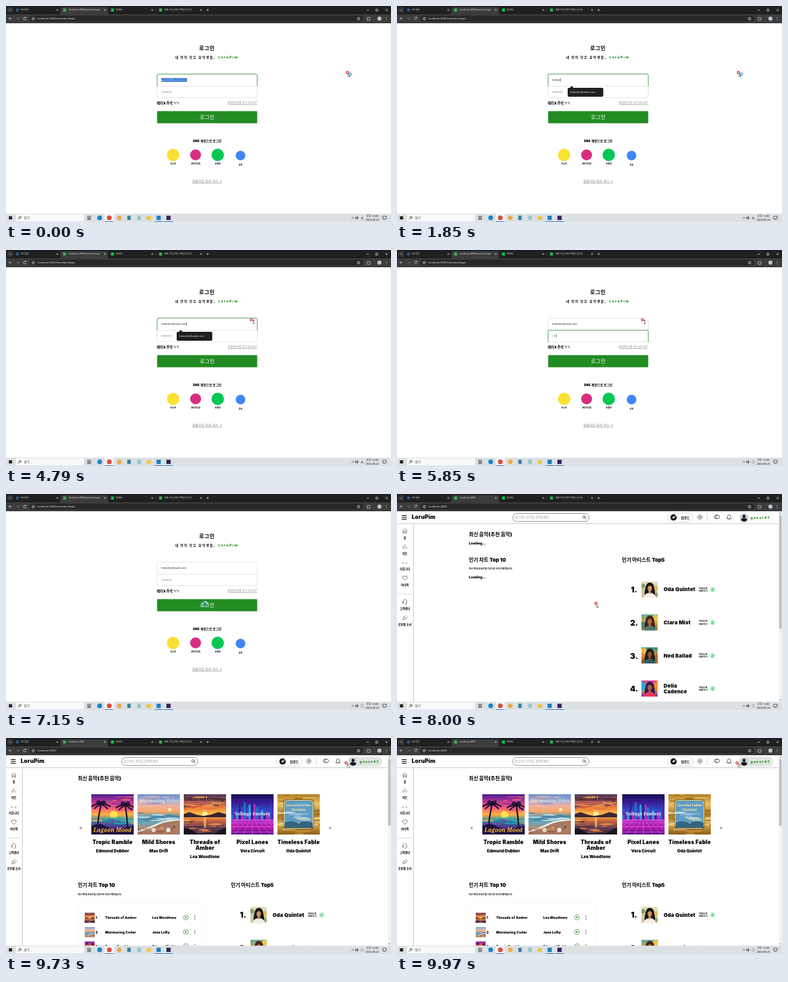
Write an HTML page that moves like this. It is 600 px wide and 338 px high and loops after 10000 ms.

```html
<!DOCTYPE html>
<html>
<head>
<meta charset="utf-8">
<title>Login</title>
<style>
html, body { margin: 0; width: 100%; height: 100%; overflow: hidden; background: #fff; }
svg { display: block; width: 100vw; height: 100vh; }
text { font-family: Inter, 'Noto Sans CJK KR', 'Noto Sans CJK', sans-serif; fill: #111; white-space: pre; }
.u { font-family: 'Noto Sans', 'Noto Sans CJK KR', 'Noto Sans CJK', sans-serif; }
.b { font-weight: 900; fill: #000; }
.m { text-anchor: middle; }
.l { fill: none; stroke: #222; stroke-width: .7; stroke-linecap: round; stroke-linejoin: round; }
.w { fill: none; stroke: #ddd; stroke-width: .7; }
</style>
</head>
<body>
<svg id="stage" viewBox="0 0 600 338"></svg>
<script>
const LOOP = 10000, GREEN = '#228b22';
const BRAND = 'LoruPim', USER = 'guest47', MAIL = 'hnkettle@vozel.com', OLD_MAIL = USER + '@vozel.com';
const LOGIN_URL = 'localhost:3000/member/login', HOME_URL = 'localhost:3000';

// Text is placed by its vertical middle.
const txt = (x, y, size, str, cls = '', attr = '') =>
  `<text x="${x}" y="${y + size * .36}" font-size="${size}" class="${cls}" ${attr}>${str}</text>`;
const box = (x, y, w, h, fill, attr = '') =>
  `<rect x="${x}" y="${y}" width="${w}" height="${h}" fill="${fill}" ${attr}/>`;
const dot = (x, y, r, fill, attr = '') => `<circle cx="${x}" cy="${y}" r="${r}" fill="${fill}" ${attr}/>`;
const line = (d, cls = 'l', attr = '') => `<path d="${d}" class="${cls}" ${attr}/>`;
const shape = (d, fill, attr = '') => `<path d="${d}" fill="${fill}" ${attr}/>`;
const group = (id, body, attr = '') => `<g id="${id}" ${attr}>${body}</g>`;
const WIDE = 'letter-spacing=".025em"';

// ---- artwork, on a 66 by 63 field ----
function art(id, colors, body) {
  const stops = colors.map((c, i) => `<stop offset="${i / (colors.length - 1)}" stop-color="${c}"/>`).join('');
  return `<linearGradient id="g-${id}" x2="0" y2="1">${stops}</linearGradient>
    <symbol id="${id}" viewBox="0 0 66 63" preserveAspectRatio="none">${box(0, 0, 66, 63, `url(#g-${id})`)}${body}</symbol>`;
}
const use = (id, x, y, w, h = w) => `<use href="#${id}" x="${x}" y="${y}" width="${w}" height="${h}"/>`;

function random(seed) {
  return () => (seed = seed * 16807 % 2147483647) / 2147483647;
}
// Flat clouds or ripples between two heights.
function streaks(seed, n, y0, y1, colors) {
  const rnd = random(seed);
  let s = '';
  for (let i = 0; i < n; i++) {
    s += `<ellipse cx="${rnd() * 66}" cy="${y0 + rnd() * (y1 - y0)}" rx="${4 + rnd() * 9}" ry="${.5 + rnd() * 1.2}" fill="${colors[i % colors.length]}" opacity=".75"/>`;
  }
  return s;
}
function palm(x, y, h, lean) {
  const top = x + lean;
  let leaves = '';
  for (let i = 0; i < 9; i++) {
    const a = Math.PI * (.9 + i * .15), r = 11 + i % 2 * 4;
    const ex = top + Math.cos(a) * r, ey = y - h + Math.sin(a) * r * .6 + 5;
    leaves += `M${top} ${y - h}Q${(top + ex) / 2} ${ey - 6} ${ex} ${ey}`;
  }
  return `<path d="M${x} ${y}Q${x + lean * .2} ${y - h / 2} ${top} ${y - h}${leaves}" fill="none" stroke="#1b1030" stroke-width="2.2"/>`;
}
function towers(seed, n, base, colors) {
  const rnd = random(seed);
  let s = '';
  for (let i = 0; i < n; i++) {
    const h = 8 + rnd() * 22;
    s += box(i * 66 / n, base - h, 66 / n - .8, h, colors[i % colors.length], 'opacity=".85"');
  }
  return s;
}
function rays(y, color) {
  let d = '';
  for (let i = -6; i <= 6; i++) d += `M${33 + i * 4} ${y}L${33 + i * 14} 63`;
  for (let i = 0; i < 5; i++) d += `M0 ${y + i * i * 1.2}H66`;
  return `<path d="${d}" fill="none" stroke="${color}" stroke-width=".7"/>`;
}
const caption = (y, size, str, fill, attr = '') =>
  `<text x="33" y="${y}" font-size="${size}" text-anchor="middle" style="fill:${fill};font-family:'Noto Serif',serif;font-weight:700" ${attr}>${str}</text>`;

function portrait(id, colors, hair, skin, top, deco) {
  return art(id, colors, deco +
    shape('M14 63Q10 46 16 26 20 4 35 5 50 6 52 28 58 48 52 63Z', hair) +
    shape('M8 63Q13 47 29 45H38Q54 47 59 63Z', top) + shape('M29 36H38V46Q33 52 29 46Z', skin) +
    `<ellipse cx="33.5" cy="27" rx="9" ry="12.5" fill="${skin}"/>` +
    shape('M22 30Q22 11 34 11 46 11 46 30 42 18 34 17 26 18 22 30Z', hair));
}

const defs = '<defs>' +
  art('tropic', ['#43218a', '#b22f9c', '#f4587c', '#ffb03e', '#1f8aa6', '#552a86', '#1d1040'],
    streaks(7, 16, 3, 27, ['#ff7a5a', '#e23f93', '#6a2c9c']) + dot(35, 32, 6, '#ffe04f') +
    streaks(11, 18, 37, 48, ['#ffb84f', '#27b5b8', '#7a3aa0']) + palm(9, 58, 42, 6) + palm(57, 58, 40, -4) +
    shape('M0 50Q12 43 24 51T66 49V63H0Z', '#22123f') + caption(59, 8.6, 'Lagoon Mood', '#ffc23e', 'font-style="italic"')) +
  art('beach', ['#6f93cf', '#9aa6d0', '#eeb1a4', '#f7a865', '#4f8fb0', '#6da5b4', '#b78a70', '#8c5f4c'],
    streaks(5, 14, 3, 20, ['#d9a5b8', '#f1c0a2', '#7c93c2']) + dot(50, 24, 2.6, '#fff3b8') +
    streaks(9, 22, 29, 42, ['#d6e9ee', '#3f7fa0', '#88b9c4']) + shape('M0 57Q18 52 30 46T66 39V63H0Z', '#eef2f0') +
    shape('M0 60Q20 54 32 48T66 41V63H0Z', '#a87a62') + streaks(3, 10, 54, 62, ['#8a5c4a', '#bd9076']) +
    dot(25, 56, 3.2, '#f0d9c8') + dot(38, 53, 2.6, '#d9926e') + dot(48, 56, 3.4, '#f6e6d8') + dot(57, 51, 2, '#7a4d40') +
    caption(13, 7, 'Murmuring Tides', '#cfe0f2')) +
  art('lake', ['#4b3a5c', '#a2525a', '#ef7c38', '#ffc04c', '#c4603c', '#6f4254', '#2a2036'],
    streaks(13, 24, 2, 26, ['#5a3d5c', '#f08a3c', '#c9573f', '#ffb050']) + dot(33, 31, 4, '#fff2a6') +
    shape('M0 31L9 28 20 32 30 34 42 32 54 28 66 31V36H0Z', '#3a2434') +
    streaks(17, 26, 38, 60, ['#ffae4c', '#43304a', '#d9703c', '#2f2238']) + box(31.5, 36, 3, 16, '#ffd978', 'opacity=".7"') +
    shape('M0 63V54Q10 52 22 63ZM66 63V52Q54 56 48 63Z', '#1a1422') + caption(10, 6.3, 'Unhurried Evenings', '#1c1420')) +
  art('neon', ['#17104f', '#3a1a96', '#2a4fc4', '#7d25c0', '#b51fb0', '#5a1190'],
    towers(4, 17, 40, ['#1d7fc8', '#5a26b8', '#2bb4d8', '#301a88', '#c42fc0']) + rays(40, '#ff5ad8') +
    caption(33, 7, 'Voltage Fantasy', '#eafaff')) +
  art('gilded', ['#b37d24', '#e8c265', '#a87420', '#d9ae4c', '#8a5a18'],
    streaks(21, 44, 1, 62, ['#f6dd8e', '#8a5c1c', '#c9963a']) + box(9, 8, 48, 47, '#8a5c1c', 'rx="5"') +
    box(10.5, 9.5, 45, 44, '#5f9cc4', 'rx="5" stroke="#f3d67a" stroke-width="1.2"') +
    streaks(23, 14, 28, 50, ['#d9ecf2', '#9cc6dc', '#e9d9a0']) + shape('M11 53V45Q22 39 33 46 44 39 55 45V53Z', '#35647c') +
    caption(19, 5, 'Graceful Fables', '#fbe9a4') + caption(26, 5, 'Chamber', '#fbe9a4')) +
  art('town', ['#2a1560', '#6a2a9c', '#e0528c', '#3a2068', '#120c2c'],
    towers(8, 13, 44, ['#1c1248', '#3c2276', '#241554']) + streaks(6, 16, 44, 62, ['#e0559a', '#2f6fb8', '#1a1038'])) +
  art('depths', ['#0a2a30', '#147060', '#1e8f72', '#0c4440', '#061a20'],
    shape('M26 0H40L52 63H14Z', '#5ad0a4', 'opacity=".45"') + streaks(19, 20, 6, 60, ['#07282a', '#37b48c', '#0d5048'])) +
  art('pulse', ['#0b1a22', '#12503c', '#1d7a4a', '#2a3420', '#0a0f14'],
    streaks(27, 20, 6, 60, ['#e88a2c', '#0c2420', '#2fa85c']) +
    line('M12 4L28 28 22 31 42 60M50 4L40 26 47 28 34 50', '', 'fill="none" stroke="#7cec70" stroke-width="1.6"')) +
  portrait('p-oda', ['#e9e2c8', '#c6cfa6', '#d9c09a'], '#1f1512', '#c9926f', '#f3efe6', dot(6, 18, 9, '#7fa266') + dot(60, 26, 9, '#e0bd62') + dot(60, 52, 8, '#8aa86c')) +
  portrait('p-clara', ['#5aa89c', '#d9ab48', '#6f7a4c'], '#4a2419', '#a96a48', '#4f7a6c', dot(57, 14, 12, '#e9c54e') + dot(5, 40, 12, '#3f8a80')) +
  portrait('p-ned', ['#2c8c8b', '#dd9340', '#724027'], '#241815', '#8a5436', '#285f68', dot(10, 14, 12, '#eab74d') + shape('M42 63L60 24 66 28V63Z', '#b5632a')) +
  portrait('p-delia', ['#d82c95', '#f3c12e', '#6b2cb8'], '#3a1a50', '#a85f42', '#e53a60', shape('M0 0L28 26 0 44Z', '#29a5dc') + shape('M66 0L40 26 66 48Z', '#f58b28')) +
  '</defs>';

// ---- browser frame and task bar ----
const closeX = x => line(`M${x - 1.3} 4.9l2.6 2.6m0-2.6l-2.6 2.6`, 'w');
const tabText = (x, str, attr = '') => txt(x, 6.2, 3.5, str, 'u', `style="fill:#e3e3e3" ${attr}`);
const chrome = box(0, 0, 600, 14, '#1f2020') + box(0, 13, 600, 14, '#3c3c3c') +
  box(2, 2, 9, 8.5, '#343535', 'rx="2.5"') + line('M5 5.5l1.5 1.5 1.5-1.5', 'w') +
  shape('M83 13.5Q85 13.5 85 11.5V4Q85 2 87 2H157Q159 2 159 4V11.5Q159 13.5 161 13.5Z', '#3c3c3c') +
  box(15.8, 4, 4, 4.4, '#2b5a94') + tabText(23, 'H2 콘솔') + closeX(80) +
  box(89, 4, 4.6, 4.6, '#3fae5a') + tabText(98, LOGIN_URL, 'id="tab"') + closeX(154) +
  box(163.6, 4, 4.6, 4.6, '#06c755') + tabText(171, 'VOZEL') + closeX(228) +
  box(238.6, 4, 4.6, 4.6, '#35b558') + tabText(247, '회원 가입 인증 이메일 입니다.') + closeX(304) +
  box(233, 4, .5, 5, '#555') + line('M312.4 6.2h3.6m-1.8-1.8v3.6', 'w') +
  line('M562 6.5h4M591.4 4.6l3.4 3.4m0-3.4l-3.4 3.4', 'w') + '<rect x="576.4" y="5" width="3" height="3" class="w"/>' +
  box(36, 15, 521, 9.6, '#282828', 'rx="4.8"') +
  line('M9 19.7h-4.5m1.8-1.8l-1.8 1.8 1.8 1.8', 'w') + line('M16 19.7h4.5m-1.8-1.8l1.8 1.8-1.8 1.8', 'w', 'opacity=".4"') +
  line('M30.8 18.2a2.1 2.1 0 1 0 .4 2M31.2 17v1.6h-1.6', 'w') +
  dot(42.5, 19.8, 3.6, '#3c3c3c') + '<circle cx="42.5" cy="19.8" r="1.6" class="w"/>' +
  txt(49, 19.7, 4.24, LOGIN_URL, 'u', 'id="url" style="fill:#e8e8e8"') +
  line('M549.5 17.3l.7 1.6 1.8.2-1.3 1.2.4 1.8-1.6-.9-1.6.9.4-1.8-1.3-1.2 1.8-.2z', 'w') +
  line('M563 18.2h1.5q.6-1.6 1.3 0h1.4v1.4q1.5.7 0 1.4v1.3H563z', 'w') +
  dot(582, 19.7, 3.2, '#b9c3ca') + [17.7, 19.7, 21.7].map(y => dot(592.5, y, .5, '#ddd')).join('');

const taskbar = box(0, 325, 600, 13, '#dbe0e3') + box(4.5, 329, 5, 5, '#222') +
  box(15, 325.5, 107, 12, '#f8f9fa', 'stroke="#c9ced1" stroke-width=".4"') +
  '<circle cx="21.8" cy="330.8" r="1.7" class="l"/>' + line('M20.5 332.2l-1.8 1.8') +
  txt(28, 331.5, 4.8, '찾기', 'u', 'style="fill:#444"') +
  line('M127.5 329h4.5v2h-4.5zM127.5 332.7h4.5v1.5h-4.5z') +
  box(153.5, 325, 15, 13, '#f1f4f5') +
  dot(146, 331.5, 3.7, '#1c86c8') + dot(161, 331.5, 3.7, '#e6483b') + dot(176.5, 331.5, 3.6, '#ecab4c') +
  box(189, 328.2, 5.4, 6.6, '#3f7f9d') + box(204.5, 328.2, 5.6, 6.6, '#8fc8cf') + box(219, 329, 7, 5.4, '#f2c345') +
  box(234.6, 328.2, 6.6, 6.6, '#1c7cc4') + box(250, 328.2, 6.6, 6.6, '#35215d') +
  [154, 231.5, 246.5].map(x => box(x, 337, 13.5, 1, '#2a7ac0')).join('') +
  line('M538.8 332.3l1.7-1.7 1.7 1.7') +
  line('M545 330.7h1l1.5-1.3v4.4l-1.5-1.3h-1zM548.7 330.6q.8 1 0 2') +
  group('ime-on', txt(555, 331.6, 5.4, 'A', 'm u')) +
  group('ime-off', '<circle cx="555" cy="331.6" r="2.3" fill="none" stroke="#8b8f92" stroke-width=".6"/>' +
    line('M554.2 330.8l1.6 1.6m0-1.6l-1.6 1.6', '', 'stroke="#8b8f92" stroke-width=".5"')) +
  txt(571, 328.6, 4, '오후 12:03', 'm u') + txt(571, 334.5, 4, '2024-08-26', 'm u') +
  line('M587.5 329h5v4h-2l-1.2 1.3v-1.3h-1.8z');

// ---- login page ----
const frame = y => `M235.5 ${y + 19}V${y + 1.5}Q235.5 ${y} 237 ${y}H390Q391.5 ${y} 391.5 ${y + 1.5}V${y + 19}`;
const sns = [[260.5, 9.7, '#fae232', '모노톡'], [295.5, 8.5, '#d82d7e', '포토마루봄'], [330, 9.7, '#06c755', '보젤넷'], [365.5, 7.5, '#4285f4', '루민']];
const login = group('login',
  txt(313.3, 66, 8.2, '로그인', 'b m', 'letter-spacing=".6"') +
  txt(263.5, 80, 5, '내 안의 모든 음악생활,', 'b', 'letter-spacing="1.3"') +
  txt(331, 80, 5, BRAND, 'b', `letter-spacing="1.5" style="fill:${GREEN}"`) +
  '<rect x="235.5" y="106.5" width="156" height="37" rx="2" fill="#fff" stroke="#dfe1e4" stroke-width=".8"/>' +
  line('M235.5 125.5H391.5', '', 'stroke="#dfe1e4" stroke-width=".8"') +
  line(frame(106.5), '', `id="focus" fill="none" stroke="${GREEN}" stroke-width=".7"`) +
  box(242, 113, 40, 5.6, '#2c6fd1', 'id="sel"') + txt(242, 115.8, 4.1, OLD_MAIL, 'u', 'id="mail"') +
  box(242, 131.4, 16, 5.4, '#2c6fd1', 'id="pw-sel"') + txt(242, 134.3, 3.9, '', 'u', 'id="pw"') +
  box(0, 113, .5, 5.6, '#000', 'id="caret"') +
  group('hint', shape('M269 128.5L272.3 125 275.6 128.5Z', '#1f2020') + box(266, 128, 55.5, 14, '#1f2020', 'rx="2"') +
    txt(270, 135, 4.1, MAIL, 'u', 'style="fill:#f2f2f2"')) +
  txt(235, 151.6, 5.3, '에러X 주석ㄱㄱ', 'b') +
  txt(391.5, 151.4, 4.6, '비밀번호를 잊으셨나요?', '', 'text-anchor="end" text-decoration="underline" style="fill:#888"') +
  box(235.5, 164.5, 156, 19, GREEN, 'rx="1"') + txt(313.7, 174, 8, '로그인', 'm', 'style="fill:#fff" letter-spacing=".3"') +
  txt(313.5, 211, 5, 'SNS 계정으로 로그인', 'b m') +
  sns.map(([x, r, c, s], i) => dot(x, 233 + (i == 3), r, c) + txt(x, i == 3 ? 248.7 : 247, 3.2, s, 'b m')).join('') +
  txt(313.5, 274, 5.1, '회원가입 하러 가기 →', 'm', 'text-decoration="underline" style="fill:#777"'));

// ---- home page ----
const menu = [
  [68, '홈', 'M8.8 57.6L12.2 54.4 15.6 57.6M9.6 57V61.5H11V58.8H13.4V61.5H14.8V57'],
  [93, '차트', 'M9.4 81.5V85.5M12.2 78.5V85.5M15 82.5V85.5'],
  [117.5, '커뮤니티', 'M8.2 109q1-3 2.4 0M13.8 109q1-3 2.4 0M9.4 105.4h.1M15 105.4h.1M12.2 106.6h.1'],
  [142, '마이픽', 'M12.2 135.2L8.6 131.5Q8 128 10.4 128.2 11.6 128.4 12.2 129.6 12.8 128.4 14 128.2 16.4 128 15.8 131.5Z'],
  [179.5, '고객센터', 'M9 169.5Q9 165 12.2 165.2 15.4 165 15.4 169.5M9 168.5v2.6h1v-2.6M14.4 168.5v2.6h1M15.2 171.3q-.6 1.6-3 1.6'],
  [204.5, '로루핌 소식', 'M9 197L11 191.5 14.5 195ZM13.2 191.4q1.6-.2 1.2-1.6M15 193.4l1.8-.8']
];
const header = line('M0 46.4H595M25.5 46.4V325', '', 'stroke="#bbb" stroke-width=".8"') +
  line('M7.5 33.6h7.6m-7.6 2.9h7.6m-7.6 2.9h7.6', '', 'stroke="#111" stroke-width="1.2"') + txt(23, 36.3, 8.5, BRAND, 'b', WIDE) +
  '<rect x="180.5" y="30.5" width="118.5" height="12.5" rx="6" fill="#fff" stroke="#666" stroke-width=".7"/>' +
  txt(184, 36.6, 4.5, '찾으려는 음악을 검색하세요!', '', 'style="fill:#999"') +
  '<circle cx="291.4" cy="35.8" r="1.9" class="l"/>' + line('M292.9 37.2l2 2') +
  '<rect x="421.5" y="29.5" width="39.5" height="14.5" rx="7" fill="#fff" stroke="#c4c4c4" stroke-width=".7"/>' +
  dot(431, 36.7, 4.9, '#111') + dot(431, 36.7, 1.6, '#fff') + line('M435.6 32.4l-3.2 4', '', 'stroke="#fff" stroke-width="1"') +
  txt(449.3, 36.7, 5, '업로드', 'b m') +
  '<circle cx="472" cy="36.2" r="1.9" class="l"/>' +
  [0, 1, 2, 3, 4, 5, 6, 7].map(i => line('M472 33v-1', 'l', `transform="rotate(${i * 45} 472 36.2)"`)).join('') +
  box(483, 31, .6, 11, '#bbb') +
  line('M497.5 33q-3-.3-3 2.7 0 3 3 2.8h2M498.5 33h1q3.2 0 3.2 2.8 0 2.7-3.2 2.7-3 0-3-2.7 0-2.8 3-2.8') +
  line('M514.2 38.4q1.1-1 1.1-3.2 0-2.7 2.2-2.7t2.2 2.7q0 2.2 1.1 3.2zM516.8 39.8h1.4') +
  box(533, 29, 53, 15.6, '#e1e6e0', 'rx="7" id="chip"') + dot(541, 36.8, 6.6, '#c9d2d6') +
  dot(540.8, 35, 2.4, '#15191f') + shape('M536 41Q536 37.4 540.8 37.4T545.8 41Q543.5 43.4 541 43.4T536 41Z', '#15191f') +
  txt(551, 36.8, 5, USER, 'b', `letter-spacing="1.4" style="fill:${GREEN}"`) +
  menu.map(([y, s, d]) => line(d, '', 'fill="none" stroke="#333" stroke-width=".6"') + txt(12.3, y, 4.4, s, 'b m')).join('') +
  box(2, 156, 21, .6, '#bbb');

const songs = [['lake', 'Threads of Amber', 'Lea Woodtone'], ['beach', 'Murmuring Cedar', 'Jane Lofty'],
  ['tropic', 'Tropic Ramble', 'Edmund Dubber'], ['neon', 'Pixel Lanes', 'Vera Circuit'], ['town', 'Town Haze', 'Carl Breaks'],
  ['gilded', 'Timeless Fable', 'Oda Quintet'], ['depths', 'Calm Depths', 'Peter Twang'], ['pulse', 'Magnetic Pulse', 'Simon Riff']];
const chart = '<rect x="112.5" y="131.5" width="198" height="235" rx="2" fill="#fff" stroke="#f6f6f6" stroke-width=".8"/>' +
  songs.map(([id, name, who], i) => {
    const y = 154 + i * 22.45;
    return use(id, 122.5, y - 8, 16) + txt(139.6, y, 5.2, i + 1, 'b') + txt(154.5, y, 5.2, name, 'b', WIDE) + txt(228, y, 5.2, who, 'b') +
      dot(280.3, y - .5, 3.8, '#fff', `stroke="${GREEN}" stroke-width=".7"`) + shape(`M279.2 ${y - 2.2}l2.9 1.7-2.9 1.7z`, GREEN) +
      [-2.4, 0, 2.4].map(d => dot(294.3, y + d - .4, .65, '#222')).join('');
  }).join('');

const artist = (id, lines, i) => {
  const y = 149.5 + i * 51.7;
  return txt(369.5, y + .3, 12, i + 1 + '.', 'b m') + use(id, 381, y - 13, 25.4) +
    lines.map((s, k) => txt(415.5, y + (k - (lines.length - 1) / 2) * 9, 7.9, s, 'b', WIDE)).join('') +
    txt(470.5, y - 2, 3.6, '아티스트', 'b') + txt(470.5, y + 2.2, 3.6, '바로가기', 'b') +
    dot(492, y, 4, '#b4efc9') + dot(491.2, y + 1.3, .9, '#25a552') + line(`M492 ${y + 1.2}v-3.2l1.4.8`, '', 'fill="none" stroke="#25a552" stroke-width=".6"');
};
const ned = ['p-ned', ['Ned Ballad']], delia = ['p-delia', ['Delia', 'Cadence']];
const pair = (id, a, b) => group(id, artist(...a, 2) + artist(...b, 3));

const cards = [[133, 'tropic', ['Tropic Ramble'], 'Edmund Dubber'], [205, 'beach', ['Mild Shores'], 'Max Drift'],
  [277, 'lake', ['Threads of', 'Amber'], 'Lea Woodtone'], [351, 'neon', ['Pixel Lanes'], 'Vera Circuit'], [423, 'gilded', ['Timeless Fable'], 'Oda Quintet']];
const carousel = group('carousel', txt(116.5, 140.5, 7, '&lt;', 'm') + txt(505, 140.5, 7, '&gt;', 'm') +
  cards.map(([x, id, lines, who]) => use(id, x, 88, 66, 63) +
    lines.map((s, k) => txt(x + 33, 162.8 + k * 9, 8.4, s, 'b m', WIDE)).join('') +
    txt(x + 33, 177 + (lines.length - 1) * 8.7, 6.4, who, 'b m')).join(''));

const loading = (id, x, y) => txt(x, y, 5.2, 'Loading...', 'b', `id="${id}"`);
const home = group('home', header + txt(112, 63, 7.9, '최신 음악(추천 음악)', 'b') + loading('load-new', 112, 77) + carousel +
  group('lower', txt(112, 103, 7.9, '인기 차트 Top 10', 'b') + txt(112, 117.2, 3.4, '최근 1주일 조회수를 기준으로 순위가 매겨집니다.', 'b') +
    loading('load-chart', 112, 130) + group('chart', chart) +
    txt(350.5, 103, 7.9, '인기 아티스트 Top5', 'b') + loading('load-artists', 350.5, 117) +
    group('artists', artist('p-oda', ['Oda Quintet'], 0) + artist('p-clara', ['Clara Mist'], 1) + pair('order-a', ned, delia) + pair('order-b', delia, ned))) +
  group('scroll', box(595, 27, 5, 298, '#f3f3f3') + shape('M596 30.6h3l-1.5-2z', '#777') + shape('M596 321.4h3l-1.5 2z', '#777') +
    box(595.7, 33, 3.6, 100, '#bcbcbc', 'id="thumb"')));

// ---- pointer ----
const pointer = group('pointer',
  group('ring', dot(0, 0, 3, '#f7cfcb', 'opacity=".6"') + dot(0, 0, 1.7, '#fff', 'stroke="#d8352f" stroke-width="1.2"')) +
  group('arrow', shape('M.8 1.6V6.4L2 5.4 2.8 7.2 3.6 6.8 2.8 5.1H4.3Z', '#fff', 'stroke="#222" stroke-width=".5"')) +
  group('busy', dot(4.3, 2.5, 2, '#e6f4fc', 'stroke="#2a8fd0" stroke-width="1.1"')) +
  group('beam', line('M2.6 .8h1.8M3.5.8v5M2.6 5.8h1.8')) +
  group('hand', shape('M2.4 1.4q.8-.5 1 .3V4l2 .5q.8.3.5 1.4L5.4 7.6H2.9L1 5.2q.4-.8 1.4 0Z', '#fff', 'stroke="#222" stroke-width=".5"')) +
  group('wait', dot(0, 1, 3.7, 'none', 'stroke="#5cc4d8" stroke-width="1.7"') + line('M0-2.7A3.7 3.7 0 0 1 3.7 1', '', 'fill="none" stroke="#c5eff5" stroke-width="1.7"')));

document.getElementById('stage').innerHTML = defs + box(0, 0, 600, 338, '#fff') + login + home + chrome + taskbar + pointer;

const el = {};
document.querySelectorAll('[id]').forEach(e => el[e.id] = e);
const show = (id, on) => { el[id].style.display = on ? '' : 'none'; };
const put = (id, s) => { if (el[id].textContent !== s) el[id].textContent = s; };

const stops = [[0, 532, 104], [4350, 532, 104], [4750, 382.5, 109.3], [6400, 382.5, 109.3], [6850, 310, 171],
  [8750, 310, 171], [9150, 535, 55.7], [9480, 535, 55.7], [9720, 530, 39], [LOOP, 530, 39]];
function pointerAt(t) {
  const i = stops.findIndex(s => s[0] > t), [t0, x0, y0] = stops[i - 1], [t1, x1, y1] = stops[i];
  const p = (t - t0) / (t1 - t0), e = p * p * (3 - 2 * p);
  return [x0 + (x1 - x0) * e, y0 + (y1 - y0) * e];
}
function lettersAt(t) {
  if (t < 450) return 0;
  return Math.min(MAIL.length, t < 1950 ? 1 + Math.floor((t - 450) / 250) : 7 + Math.floor((t - 1950) / 200));
}

function drawLogin(t) {
  const fresh = t < 300, onPw = t >= 5400 && t < 6900, pwSel = t >= 5400 && t < 5600;
  put('mail', fresh ? OLD_MAIL : MAIL.slice(0, lettersAt(t)));
  el.mail.style.fill = fresh ? '#fff' : '#111';
  show('sel', fresh);
  const dots = t < 5600 ? 11 : Math.min(11, 1 + Math.floor((t - 5600) / 65));
  put('pw', '•'.repeat(dots));
  el.pw.style.fill = pwSel ? '#fff' : '#111';
  show('pw-sel', pwSel);
  show('focus', t < 6900);
  el.focus.setAttribute('transform', `translate(0 ${onPw ? 19 : 0})`);
  show('hint', t >= 450 && t < 5400);
  show('caret', !fresh && !pwSel && t < 6900);
  el.caret.setAttribute('x', 242.2 + el[onPw ? 'pw' : 'mail'].getComputedTextLength());
  el.caret.setAttribute('y', onPw ? 131.5 : 113);
}

function drawHome(t) {
  const artists = t >= 7550, chartOn = t >= 8700, cardsOn = t >= 9600;
  show('load-new', !cardsOn);
  show('carousel', cardsOn);
  show('load-chart', !chartOn);
  show('chart', chartOn);
  show('load-artists', !artists);
  show('artists', artists);
  show('order-a', !chartOn);
  show('order-b', chartOn);
  show('scroll', artists);
  show('chip', t >= 9680);
  el.lower.setAttribute('transform', `translate(0 ${cardsOn ? 127.3 : 0})`);
  el.thumb.setAttribute('height', cardsOn ? 104 : chartOn ? 123 : 178);
}

function drawPointer(t) {
  const [x, y] = pointerAt(t), atLogin = t < 7250;
  const wait = t >= 6950 && atLogin;
  const field = atLogin && x < 391 && y > 106 && y < 143;
  const hand = atLogin ? x < 391 && y > 164 : t >= 9680;
  el.pointer.setAttribute('transform', `translate(${x} ${y})`);
  show('wait', wait);
  show('ring', !wait);
  show('busy', t < 4350);
  show('beam', field);
  show('hand', hand && !wait);
  show('arrow', !wait && !field && !hand);
}

function draw(t) {
  const atLogin = t < 7250, url = atLogin ? LOGIN_URL : HOME_URL;
  show('login', atLogin);
  show('home', !atLogin);
  put('tab', url);
  put('url', url);
  show('ime-on', t < 5400);
  show('ime-off', t >= 5400);
  if (atLogin) drawLogin(t); else drawHome(t);
  drawPointer(t);
}

const start = performance.now();
function tick() {
  draw((performance.now() - start) % LOOP);
  requestAnimationFrame(tick);
}
tick();
</script>
</body>
</html>
```
